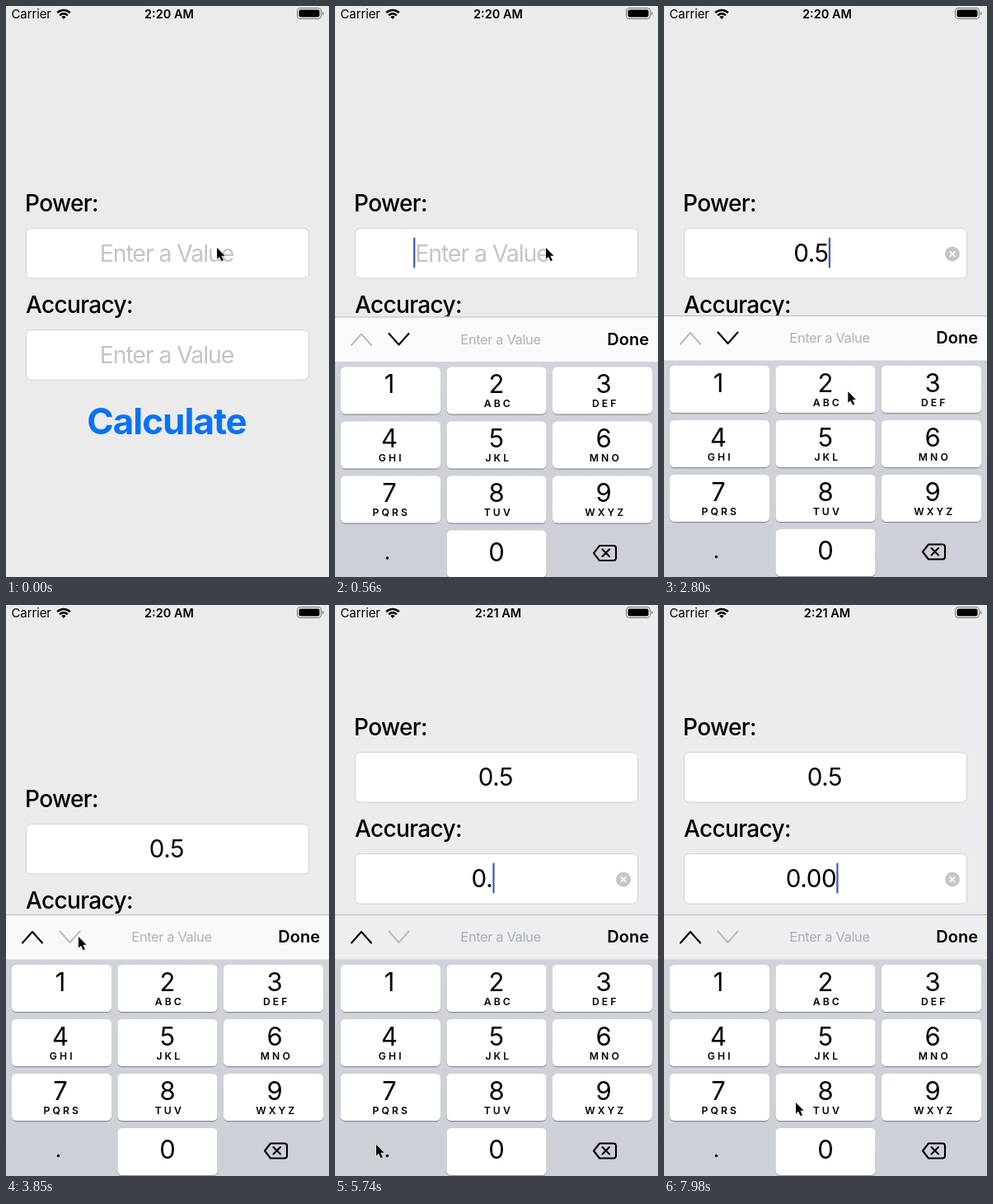
An HTML page that plays this animation: 392x692 px, repeating every 8 s.

```html
<!DOCTYPE html>
<html lang="en">
<head>
<meta charset="utf-8">
<title>Calculator form</title>
<style>
  html, body { margin: 0; width: 100%; height: 100%; overflow: hidden; background: #ebebeb; }
  svg { display: block; width: 392px; height: 692px; }
  text { font-family: Inter, Roboto, "Liberation Sans", sans-serif; font-kerning: normal; }
  .label { font-size: 28px; font-weight: 500; letter-spacing: -.65px; }
  .value { font-size: 29.5px; letter-spacing: -.3px; text-anchor: middle; }
  .hint { fill: #c4c4c6; font-size: 28.5px; letter-spacing: -1.1px; }
  .digit { font-size: 31px; text-anchor: middle; }
  .letters { font-size: 12.2px; font-weight: 600; letter-spacing: 3.1px; text-anchor: middle; }
  .line { fill: none; stroke: #000; stroke-width: 2.1; stroke-linecap: round; stroke-linejoin: round; }
</style>
</head>
<body>
<svg id="stage" viewBox="0 0 392 692">
  <defs>
    <linearGradient id="tray" x1="0" y1="0" x2="0" y2="1">
      <stop offset="0" stop-color="#d1d4da"/><stop offset="1" stop-color="#cccfd5"/>
    </linearGradient>
  </defs>
  <rect id="back" width="392" height="692"/>
  <g id="form">
    <text class="label" x="23" y="249">Power:</text>
    <text class="label" x="24" y="372">Accuracy:</text>
    <text x="195" y="519" text-anchor="middle" font-size="44" font-weight="700" letter-spacing="-1" fill="#0a72f5">Calculate</text>
  </g>
  <g id="status">
    <text x="6.5" y="15" font-size="15" letter-spacing="-.1">Carrier</text>
    <g fill="none" stroke="#000" stroke-width="2.6">
      <path d="M62.2 8.2a11 11 0 0 1 15.6 0M65.2 11.3a6.8 6.8 0 0 1 9.6 0"/>
      <path d="M70 16l-2.6-2.8a3.7 3.7 0 0 1 5.2 0z" fill="#000" stroke="none"/>
    </g>
    <text id="clock" x="198" y="15" text-anchor="middle" font-size="14.5" font-weight="600"></text>
    <rect x="353.5" y="2.5" width="29" height="13" rx="3.5" fill="none" stroke="#777"/>
    <rect x="355.5" y="4.5" width="25" height="9" rx="2"/>
    <path d="M384 6.5q3 2.5 0 5z" fill="#777"/>
  </g>
  <g id="board">
    <rect y="375" width="392" height="380" fill="url(#tray)"/>
    <rect id="bar" y="375" width="392" height="54.5"/>
    <rect y="375" width="392" height="1" fill="#b9babc"/>
    <path id="up" class="line" d="M20 409.5L32 396l12 13.5"/>
    <path id="down" class="line" d="M65.5 395.5L77.5 409l12-13.5"/>
    <text id="title" x="201" y="408" text-anchor="middle" font-size="16.5" letter-spacing="-.4" fill="#b0b2b6">Enter a Value</text>
    <text x="330.3" y="409" font-size="20" font-weight="600">Done</text>
    <g id="keys"></g>
    <circle cx="63.5" cy="667.5" r="1.7"/>
    <path class="line" d="M321 652.5h17q3 0 3 3v12q0 3-3 3h-17l-7-9zM324.5 657l8.5 8.5m0-8.5l-8.5 8.5"/>
  </g>
  <path id="mouse" d="M0 0V13.5L3 10.700L5.600 16.200L7.900 15.200L5.400 9.800H9.600Z" stroke="#fff" stroke-width=".8" paint-order="stroke"/>
</svg>
<script>
const LOOP = 8000, STEP = 70;
const $ = id => document.getElementById(id);

function add(parent, tag, attrs, text = '') {
  const el = document.createElementNS('http://www.w3.org/2000/svg', tag);
  for (const k in attrs) el.setAttribute(k, attrs[k]);
  el.textContent = text;
  parent.append(el);
  return el;
}

// Keypad
const groups = ['', 'ABC', 'DEF', 'GHI', 'JKL', 'MNO', 'PQRS', 'TUV', 'WXYZ'];
const keys = {};
function addKey(name, col, row, letters) {
  const x = 7 + col * 128.5, y = 436 + row * 66, cx = 66 + col * 130;
  add($('keys'), 'rect', { x, y: y + 1.2, width: 121, height: 57, rx: 5.5, fill: '#8b8e93' });
  keys[name] = add($('keys'), 'rect', { x, y, width: 121, height: 57, rx: 5.5 });
  add($('keys'), 'text', { class: 'digit', x: cx, y: y + (row === 3 ? 37 : 31.5) }, name);
  if (letters) add($('keys'), 'text', { class: 'letters', x: cx + 2.3, y: y + 48.5 }, letters);
}
groups.forEach((g, i) => addKey(String(i + 1), i % 3, Math.floor(i / 3), g));
addKey('0', 1, 3, '');

// Input fields
function makeField(y) {
  const form = $('form');
  add(form, 'rect', { x: 24.5, y: y + .5, width: 343, height: 60.5, rx: 6, fill: '#fff', stroke: '#d2d2d3' });
  const text = add(form, 'text', { y: y + 41 });
  const caret = add(form, 'rect', { y: y + 11.5, width: 2.2, height: 37, rx: 1, fill: '#4355b8' });
  const clear = add(form, 'g', { transform: `translate(350 ${y + 31.5})` });
  add(clear, 'circle', { r: 9, fill: '#c6c6ca' });
  add(clear, 'path', { d: 'M-3.2-3.2L3.2 3.2M3.2-3.2L-3.2 3.2', stroke: '#fff', 'stroke-width': 1.7 });
  return { text, caret, clear };
}
const power = makeField(269), accuracy = makeField(392);

function drawField(f, value, focused, alpha) {
  const cx = focused ? 178.5 : 195;
  f.text.setAttribute('class', value ? 'value' : 'value hint');
  f.text.setAttribute('x', cx);
  f.text.textContent = value || 'Enter a Value';
  const half = f.text.getComputedTextLength() / 2;
  f.caret.setAttribute('x', value ? cx + half : cx - half - 2);
  f.caret.setAttribute('opacity', focused ? alpha : 0);
  f.clear.setAttribute('opacity', focused && value ? 1 : 0);
}

// Timeline: [time, value]
const powerText = [[0, ''], [1540, '0'], [2030, '0.'], [2590, '0.5']];
const accuracyText = [[0, ''], [5110, '0'], [5670, '0.'], [6230, '0.0'], [7420, '0.00']];
const presses = [[1540, '0'], [2590, '5'], [5110, '0'], [6230, '0'], [7420, '0']];
const blinks = [[0, 140], [1540, 1540], [2030, 2030], [2590, 2590], [3710, 3985],
  [5110, 5110], [5670, 5670], [6230, 6230], [7420, 7420]];
// Pointer: [time, x, y]
const path = [
  [0, 256, 293], [840, 256, 293], [1120, 317, 520], [1330, 205, 651], [1610, 200, 651],
  [1820, 50, 652], [2100, 50, 652], [2450, 205, 528], [2660, 210, 528], [2870, 228, 446],
  [3220, 110, 408], [3500, 88, 402], [4200, 88, 402], [4900, 150, 667], [5180, 152, 666],
  [5530, 50, 654], [5740, 50, 654], [6090, 165, 660], [6300, 165, 660], [6720, 100, 483],
  [6930, 92, 470], [7350, 170, 656], [7490, 170, 656], [7980, 160, 603]
];

const at = (list, t) => list.filter(e => e[0] <= t).pop()[1];
const mix = (a, b, k) => `rgb(${a.map((v, i) => v + (b[i] - v) * k)})`;

function spring(ms) {
  const x = Math.max(0, ms) * .01826;
  return 1 - (1 + x) * Math.exp(-x);
}

function blink(ms) {
  const p = ms < 0 ? 0 : ms % 1000;
  if (p < 650) return 1;
  if (p < 800) return (800 - p) / 150;
  return p < 900 ? 0 : (p - 900) / 100;
}

function pointer(t) {
  const i = Math.max(1, path.findIndex(p => p[0] >= t));
  const [t0, x0, y0] = path[i - 1], [t1, x1, y1] = path[i];
  const u = (t - t0) / (t1 - t0), k = u * u * (3 - 2 * u);
  return [x0 + (x1 - x0) * k, y0 + (y1 - y0) * k];
}

function draw(t) {
  const second = t >= 3710;
  const rise = spring(t - 150), lift = spring(t - 3832);
  const alpha = blink(t - at(blinks, t));
  drawField(power, at(powerText, t), t >= 140 && !second, alpha);
  drawField(accuracy, at(accuracyText, t), second, alpha);
  $('form').setAttribute('transform', `translate(0 ${-91 * lift})`);
  $('board').setAttribute('transform', `translate(0 ${320 * (1 - rise)})`);
  $('back').setAttribute('fill', mix([235, 235, 235], [235, 236, 238], lift));
  $('bar').setAttribute('fill', mix([250, 250, 250], [237, 238, 240], lift));
  $('title').setAttribute('fill', mix([176, 177, 179], [168, 175, 186], lift));
  $('up').style.stroke = second ? '#000' : '#bcbdbf';
  $('down').style.stroke = second ? '#bcbdbf' : '#000';
  $('clock').textContent = t < 5390 ? '2:20 AM' : '2:21 AM';
  for (const k in keys) {
    const held = presses.some(([p, name]) => name === k && t >= p && t < p + 140);
    keys[k].setAttribute('fill', held ? '#bcc0c7' : '#fff');
  }
  $('mouse').setAttribute('transform', `translate(${pointer(t)})`);
}

function tick() {
  const t = performance.now() % LOOP;
  draw(Math.floor(t / STEP) * STEP);
  requestAnimationFrame(tick);
}
tick();
</script>
</body>
</html>
```
